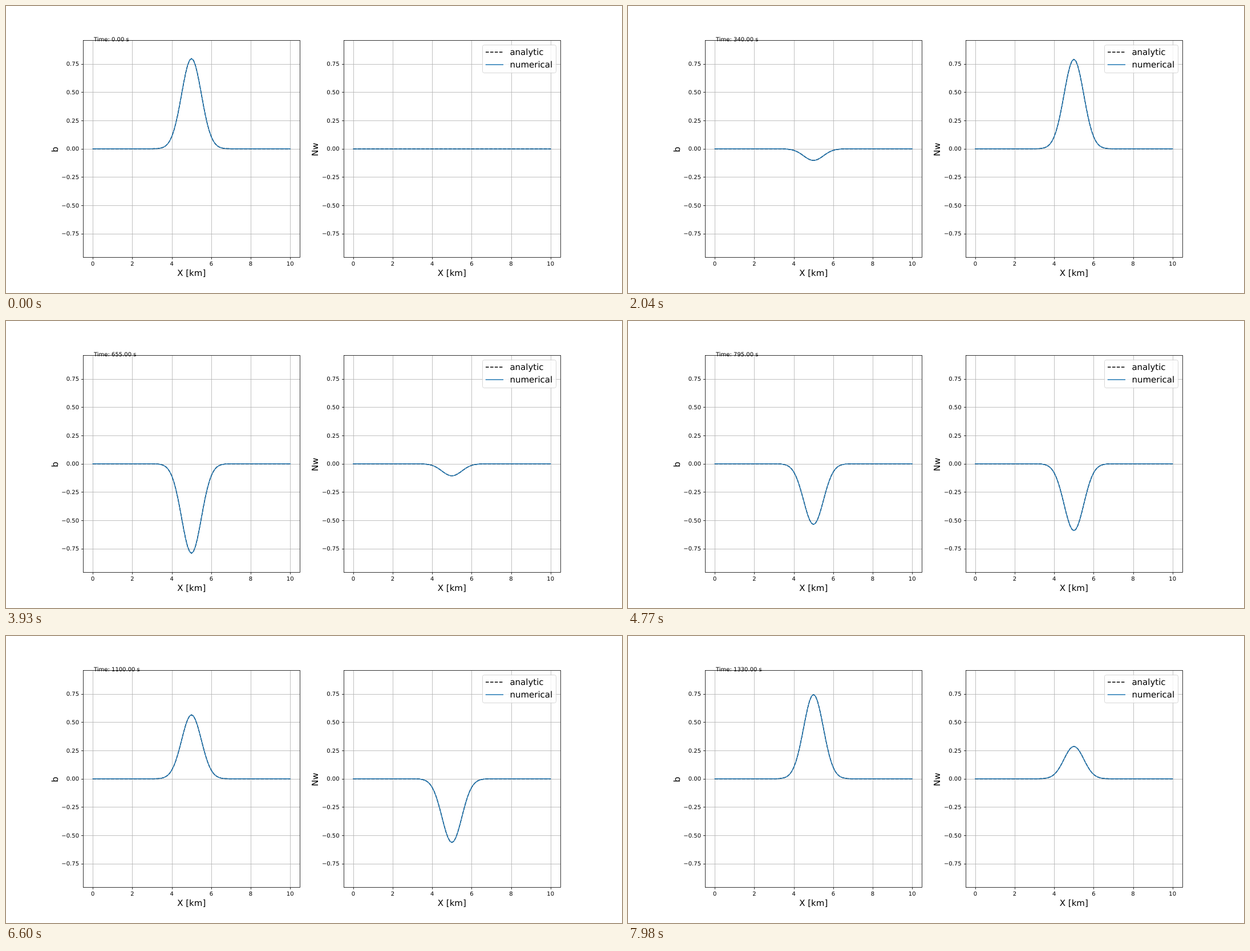
These frames come from a looping animation (1080x504 px, 8000 ms). An HTML page:

```html
<!DOCTYPE html>
<html lang="en">
<head>
<meta charset="utf-8">
<title>Oscillating Gaussian</title>
<style>
  html, body { margin: 0; width: 100%; height: 100%; overflow: hidden; background: #fff; }
  svg { display: block; width: 1080px; height: 504px; }
  text { font-family: "DejaVu Sans", sans-serif; font-size: 10px; fill: #000; text-rendering: geometricPrecision; white-space: pre; }
  .big { font-size: 15px; }
  .mid { text-anchor: middle; }
  .end { text-anchor: end; }
  .grid { stroke: #b0b0b0; stroke-width: .8; }
  .axis { stroke: #000; stroke-width: .8; fill: none; }
  .curve { fill: none; stroke-width: 1.5; stroke-linejoin: round; }
  .exact { stroke: #000; stroke-dasharray: 5.55 2.4; }
  .model { stroke: #1f77b4; stroke-linecap: square; }
</style>
</head>
<body>
<svg id="stage" viewBox="0 0 1080 504" xmlns="http://www.w3.org/2000/svg"></svg>
<script>
const LOOP = 8000, STEP = 30, DT = 5;
const FREQ = 0.005, SIGMA = 0.5, CENTER = 5, POINTS = 101;
const PEAK = 1 / (SIGMA * Math.sqrt(2 * Math.PI));
const TOP = 60.48, BOTTOM = 441, WIDTH = 380.4545;
const ZERO = (TOP + BOTTOM) / 2;
const Y_UNIT = (BOTTOM - TOP) / (2.4 * PEAK);
const X_UNIT = WIDTH / 11;

const stage = document.getElementById('stage');
const snap = v => Math.floor(v + 0.5) + 0.5;

function add(tag, attrs, text) {
  const el = document.createElementNS('http://www.w3.org/2000/svg', tag);
  for (const key in attrs) el.setAttribute(key, attrs[key]);
  if (text !== undefined) el.textContent = text;
  return stage.appendChild(el);
}

const line = (x1, y1, x2, y2, cls) => add('line', { x1, y1, x2, y2, class: cls });
const label = (x, y, text, cls) => add('text', { x, y, class: cls }, text);

function makePanel(left, name, nameX) {
  const x0 = left + WIDTH / 22;
  const l = snap(left), r = snap(left + WIDTH), t = snap(TOP), b = snap(BOTTOM);
  const xTicks = [0, 2, 4, 6, 8, 10].map(v => [v, x0 + v * X_UNIT]);
  const yTicks = [-3, -2, -1, 0, 1, 2, 3].map(n => [n / 4, ZERO - n / 4 * Y_UNIT]);

  for (const [, x] of xTicks) line(snap(x), t, snap(x), b, 'grid');
  for (const [, y] of yTicks) line(l, snap(y), r, snap(y), 'grid');

  const exact = add('path', { class: 'curve exact' });
  const model = add('path', { class: 'curve model' });

  for (const [v, x] of xTicks) {
    line(snap(x), b, snap(x), b + 3.5, 'axis');
    label(x, 456, v, 'mid');
  }
  for (const [v, y] of yTicks) {
    line(l, snap(y), l - 3.5, snap(y), 'axis');
    label(left - 7, Math.round(y + 3.7), v.toFixed(2).replace('-', '\u2212'), 'end');
  }
  add('rect', { x: l, y: t, width: r - l, height: b - t, class: 'axis' });
  label(left + WIDTH / 2, 474, 'X [km]', 'big mid');
  add('text', { transform: `translate(${nameX} 252) rotate(-90)`, class: 'big mid' }, name);

  return amp => {
    const flat = Math.abs(amp) < 1e-9;
    let d = '';
    for (let i = 0; i < POINTS; i++) {
      const v = i * 10 / (POINTS - 1);
      const g = Math.exp(-(((v - CENTER) / SIGMA) ** 2) / 2);
      const x = x0 + v * X_UNIT;
      // A perfectly level line sits on whole pixels.
      const y = flat ? Math.round(ZERO) : ZERO - amp * g * Y_UNIT;
      d += (i ? 'L' : 'M') + (flat ? Math.round(x) : x.toFixed(3)) + ' ' + y.toFixed(3);
    }
    exact.setAttribute('d', d);
    model.setAttribute('d', d);
  };
}

const drawB = makePanel(135, 'b', 91);
const drawW = makePanel(591.5455, 'Nw', 547);
const clock = label(154, 62, '', '');

add('rect', {
  x: 835.5, y: 68.5, width: 129, height: 49, rx: 3,
  fill: '#fff', 'fill-opacity': 0.8, stroke: '#ccc', 'stroke-opacity': 0.8
});
line(841, 81, 871, 81, 'curve exact');
line(841.5, 103, 871.3, 103, 'curve model');
label(883.4, 86, 'analytic', 'big');
label(883.4, 108, 'numerical', 'big');

function render(ms) {
  const time = Math.floor((ms % LOOP) / STEP) * DT;
  drawB(PEAK * Math.cos(FREQ * time));
  drawW(PEAK * Math.sin(FREQ * time));
  clock.textContent = `Time: ${time.toFixed(2)} s`;
}

const start = performance.now();
function tick() {
  render(performance.now() - start);
  requestAnimationFrame(tick);
}
render(0);
requestAnimationFrame(tick);
</script>
</body>
</html>
```
